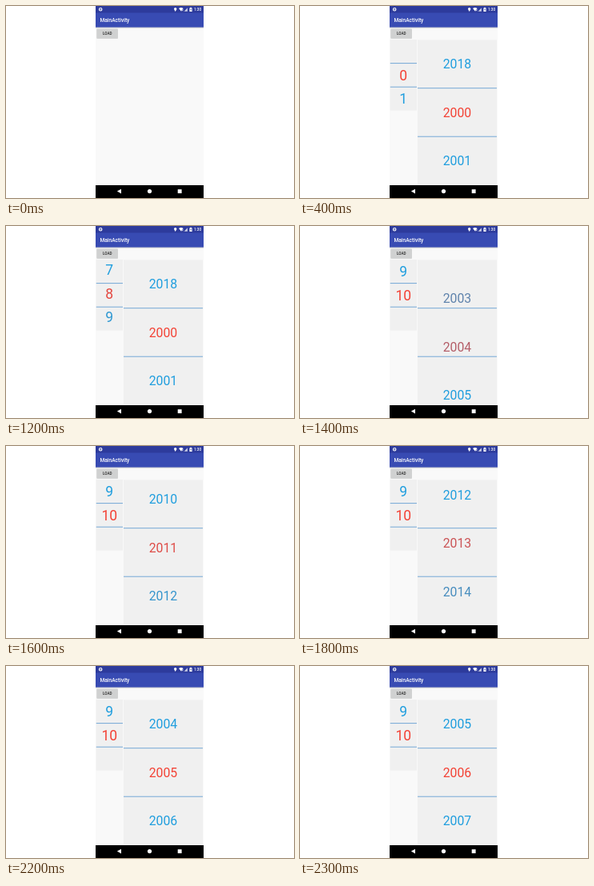
An HTML page for the animation above (2.4 s loop, 360 by 240 pixels).

```html
<!DOCTYPE html>
<html lang="en">
<head>
<meta charset="utf-8">
<title>Wheel pickers</title>
<style>
  html, body { margin: 0; width: 100%; height: 100%; overflow: hidden; background: #fff; }
  svg { display: block; width: 360px; height: 240px; }
  text { font-family: Roboto, sans-serif; }
  .medium { font-weight: 500; }
  .wheel text { text-anchor: middle; }
</style>
</head>
<body>
<svg id="stage" viewBox="0 0 360 240">
  <defs>
    <linearGradient id="shadow" x2="0" y2="1">
      <stop stop-color="#000" stop-opacity=".25"/>
      <stop offset="1" stop-color="#000" stop-opacity="0"/>
    </linearGradient>
  </defs>
  <rect x="112" width="135" height="240" fill="#f9f9f9"/>
  <rect x="112" y="26.5" width="135" height="1.8" fill="url(#shadow)"/>
  <rect x="112" y="8" width="135" height="18.6" fill="#384bb3"/>
  <rect x="112" width="135" height="8.5" fill="#2d3b9c"/>
  <text class="medium" x="117.5" y="20.1" font-size="6.6" fill="#fff">MainActivity</text>

  <!-- status bar -->
  <g fill="#fff">
    <circle cx="118.2" cy="4.3" r="1.75" fill="none" stroke="#fff" stroke-width="1.1"/>
    <circle cx="118.2" cy="4.3" r=".6"/>
    <path d="M211.7 7C210.6 5.3 210 4.4 210 3.6a1.7 1.7 0 0 1 3.4 0C213.4 4.4 212.8 5.3 211.7 7Z"/>
    <path d="M216 3.1Q218.8 1 221.6 3.1L218.8 6.6Z"/>
    <path d="M219.6 4.4l2 2m0-2l-2 2" stroke="#fff" stroke-width=".6"/>
    <path d="M222.7 6.7L226.9 2.2V6.7Z" opacity=".75"/>
    <path d="M229.4 2.4h.9v-.6h1.4v.6h.9v4.5h-3.2Z"/>
    <path d="M231.2 3l-.9 1.8h.7v1.3l.9-1.8h-.7Z" fill="#2d3b9c"/>
    <text class="medium" x="235" y="6.2" font-size="4.6">1:30</text>
  </g>

  <rect x="113.4" y="29" width="26.5" height="12" rx=".7" fill="#000" opacity=".12"/>
  <rect x="113.4" y="28.5" width="26.5" height="12" rx=".7" fill="#d0d1d1"/>
  <text class="medium" x="126.7" y="36.3" font-size="4.6" fill="#222" text-anchor="middle">LOAD</text>

  <g id="wheels"></g>

  <!-- navigation bar -->
  <rect x="112" y="224" width="135" height="16" fill="#000"/>
  <g fill="#fff">
    <path d="M138.9 231.6L144 228.8V234.4Z"/>
    <circle cx="179.5" cy="231.6" r="2.6"/>
    <rect x="214.7" y="229.2" width="4.9" height="4.9"/>
  </g>
</svg>
<script>
const LOOP = 2400, STEP = 100, SHOW_AT = 400;
const RED = [243, 67, 54], BLUE = [32, 158, 222];
const wheelLayer = document.getElementById('wheels');

function add(parent, tag, attributes) {
  const node = document.createElementNS('http://www.w3.org/2000/svg', tag);
  for (const name in attributes) node.setAttribute(name, attributes[name]);
  return parent.appendChild(node);
}

// Scroll position in rows; each key is [time, row].
function scrollAt(keys, time) {
  if (time <= keys[0][0]) return keys[0][1];
  for (let i = 1; i < keys.length; i++) {
    const [start, from] = keys[i - 1], [end, to] = keys[i];
    if (time <= end) return from + (to - from) * (time - start) / (end - start);
  }
  return keys[keys.length - 1][1];
}

function blend(distance) {
  const amount = Math.min(1, Math.abs(distance));
  return `rgb(${RED.map((c, i) => Math.round(c + (BLUE[i] - c) * amount))})`;
}

function makeWheel({ x, width, top, row, fontSize, keys, label }) {
  const height = row * 3, id = 'clip' + x;
  const clip = add(wheelLayer, 'clipPath', { id });
  const box = { x, y: top, width, height };
  add(clip, 'rect', box);
  const group = add(wheelLayer, 'g', { class: 'wheel', 'clip-path': `url(#${id})` });
  add(group, 'rect', { ...box, fill: '#f0f0f0' });
  for (const n of [1, 2])
    add(group, 'rect', { x, y: top + row * n - .5, width, height: 1, fill: '#75a9d6' });
  const texts = Array.from({ length: 5 }, () =>
    add(group, 'text', { x: x + width / 2, 'font-size': fontSize }));

  return time => {
    const position = scrollAt(keys, time), center = Math.round(position);
    texts.forEach((text, i) => {
      const index = center + i - 2, distance = index - position;
      text.textContent = label(index);
      text.setAttribute('y', top + row * (1.5 + distance) + fontSize * .355);
      text.setAttribute('fill', blend(distance));
    });
  };
}

const wheels = [
  makeWheel({
    x: 112.5, width: 33.5, top: 42, row: 29.6, fontSize: 17.5,
    keys: [[400, 0], [800, 2.87], [1200, 8.07], [1400, 10]],
    label: i => i >= 0 && i <= 10 ? i : ''
  }),
  makeWheel({
    x: 147, width: 99, top: 42.2, row: 60.5, fontSize: 15.8,
    keys: [[1300, 0], [1600, 11.1], [2000, 15.28], [2100, 20], [2200, 24], [2300, 25]],
    label: i => 2000 + (i + 19) % 19
  })
];

function draw() {
  const time = Math.floor(performance.now() % LOOP / STEP) * STEP;
  wheelLayer.setAttribute('visibility', time < SHOW_AT ? 'hidden' : 'visible');
  wheels.forEach(update => update(time));
  requestAnimationFrame(draw);
}
draw();
</script>
</body>
</html>
```
